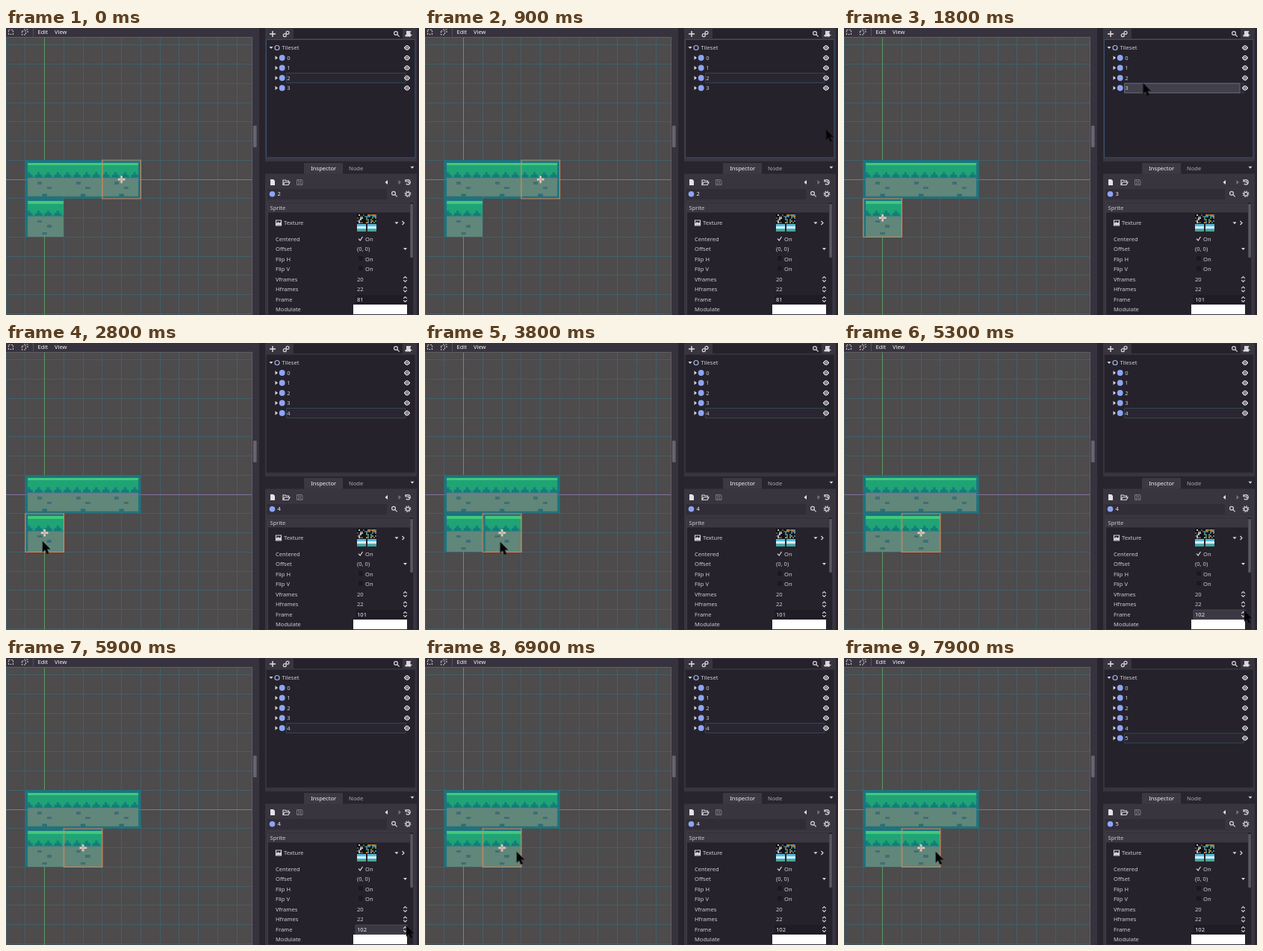
An HTML page for the animation above (8 s loop, 553 by 385 pixels).

```html
<!DOCTYPE html>
<html lang="en">
<head>
<meta charset="utf-8">
<title>Tileset editor</title>
<style>
html, body { margin: 0; width: 100%; height: 100%; overflow: hidden; background: #2a2631; }
svg { display: block; width: 100vw; height: 100vh; }
text { font: 7.55px "Noto Sans", "Open Sans", sans-serif; fill: #cfcdd3; }
.bright, .bright text { fill: #f4f3f6; }
.dim { fill: #aeaab5; }
.line { fill: none; stroke: #d8d6dc; stroke-width: 1.2; }

/* Editor states: pick 2, pick 3, copy to 4, change frame, copy to 5 */
.p2, .p3, .p4, .p5, .f81, .f101, .f102, .copy, .oldTile, .newTile, .hover, .edit, .focus, #pick, #outline {
  animation: 8s step-end infinite;
}
.p2, .f81 { animation-name: first; }
.p3 { animation-name: second; }
.p4 { animation-name: third; }
.p5 { animation-name: last; }
.f101 { animation-name: frameB; }
.f102, .newTile { animation-name: frameC; }
.copy { animation-name: copied; }
.oldTile { animation-name: dragged; }
.hover { animation-name: hover; }
.edit { animation-name: edit; }
.focus { animation-name: focus; }
#pick { animation-name: pick; }
#outline { animation-name: outline; }
#cursor { animation: cursor 8s ease-in-out infinite; }

@keyframes first { 0% { visibility: visible } 18.75%, 100% { visibility: hidden } }
@keyframes second { 0% { visibility: hidden } 18.75% { visibility: visible } 33.75%, 100% { visibility: hidden } }
@keyframes third { 0% { visibility: hidden } 33.75% { visibility: visible } 87.5%, 100% { visibility: hidden } }
@keyframes last { 0% { visibility: hidden } 87.5%, 100% { visibility: visible } }
@keyframes frameB { 0% { visibility: hidden } 18.75% { visibility: visible } 65%, 100% { visibility: hidden } }
@keyframes frameC { 0% { visibility: hidden } 65%, 100% { visibility: visible } }
@keyframes copied { 0% { visibility: hidden } 33.75%, 100% { visibility: visible } }
@keyframes hover { 0% { visibility: hidden } 18% { visibility: visible } 24%, 100% { visibility: hidden } }
@keyframes edit { 0% { visibility: hidden } 62% { visibility: visible } 77%, 100% { visibility: hidden } }
@keyframes focus { 0% { visibility: visible } 33.75%, 100% { visibility: hidden } }
@keyframes pick {
  0% { transform: none }
  18.75% { transform: translateY(13.5px) }
  33.75% { transform: translateY(27px) }
  87.5%, 100% { transform: translateY(40.5px) }
}
@keyframes outline {
  0% { transform: translate(128.9px, 177.4px) }
  18.75% { transform: translate(25.9px, 228.9px) }
  39% { transform: translate(51.6px, 228.9px) }
  43%, 100% { transform: translate(77.4px, 228.9px) }
}
@keyframes dragged {
  0% { visibility: hidden; transform: translate(25.9px, 228.9px) }
  33.75% { visibility: visible; transform: translate(25.9px, 228.9px) }
  39% { visibility: visible; transform: translate(51.6px, 228.9px) }
  43% { visibility: visible; transform: translate(77.4px, 228.9px) }
  65%, 100% { visibility: hidden; transform: translate(77.4px, 228.9px) }
}
@keyframes cursor {
  0%, 5% { transform: translate(560px, 150px) }
  10%, 11.5% { transform: translate(537px, 136px) }
  18%, 23% { transform: translate(400.5px, 74px) }
  31%, 36% { transform: translate(49px, 266px) }
  45%, 49% { transform: translate(100.7px, 267px) }
  58%, 62% { transform: translate(528.7px, 362px) }
  66%, 76% { transform: translate(536px, 359px) }
  86%, 100% { transform: translate(122.8px, 260px) }
}
</style>
</head>
<body>
<svg viewBox="0 0 553 385" preserveAspectRatio="none">
  <defs>
    <pattern id="teeth" width="4" height="16" patternUnits="userSpaceOnUse">
      <path d="M0 7.3V6H1V5H2V6H3V7H4V7.3z" fill="#147b7b"/>
    </pattern>
    <g id="ground" shape-rendering="crispEdges">
      <path d="M0 0H16V16H0z" fill="#61877a"/>
      <path d="M0 0H16V7.1H0z" fill="#20a476"/>
      <path d="M0 1H16V2.1H0z" fill="#41c87b"/>
      <path d="M0 0H16V1H0z" fill="#1b747f"/>
      <path d="M0 0H16V16H0z" fill="url(#teeth)"/>
      <path d="M5 9h2v1h-2zM9 11h2v1h-2z" fill="#416e75"/>
    </g>
    <path id="leftEdge" d="M0 0H1V16H0z" fill="#1b747f"/>
    <g id="platform">
      <use href="#ground"/>
      <path d="M0 15H16V16H0zM7 14h2v1h-2z" fill="#26707a"/>
    </g>
    <g id="wall">
      <use href="#ground"/>
      <path d="M7 14h2v1h-2z" fill="#416e75"/>
    </g>
    <g id="corner"><use href="#wall"/><use href="#leftEdge"/></g>
    <g id="eye">
      <path d="M-4.2 0Q0-7 4.2 0Q0 7-4.2 0z" fill="#e4e2e8"/>
      <circle r="2" fill="#25222c"/><circle r="1.1" fill="#e4e2e8"/>
    </g>
    <path id="spin" d="M-2.3-1.2L0-3.5 2.3-1.2M-2.3 1.2L0 3.5 2.3 1.2" class="line"/>
    <path id="drop" d="M-2.5-1.3H2.5L0 1.7z" fill="#d8d6dc"/>
    <g id="lens"><circle cx="-1" cy="-1" r="2.4" class="line"/><path d="M1 1L3.7 3.7" class="line" stroke-width="1.6"/></g>
  </defs>

  <!-- viewport -->
  <path d="M0 0H339V12H0z" fill="#37333e"/>
  <path d="M0 12H330V385H0z" fill="#4d4b4b"/>
  <g id="grid" fill="none" stroke="#41606b"></g>
  <path d="M51.5 12V385" stroke="#5a9a5f"/>
  <path d="M0 203.5H330" stroke="#82729a"/>
  <g id="tiles"></g>
  <g class="oldTile"><use href="#corner" transform="scale(3.22)"/></g>
  <g class="newTile"><use href="#wall" transform="translate(77.4 228.9) scale(3.22)"/></g>
  <path d="M26 203.5H180" stroke="#82729a" opacity=".6"/>
  <g id="outline">
    <path d="M0 0H51.5V51.5H0z" fill="none" stroke="#dc8760" stroke-width="1.2"/>
    <path d="M25.75 21V30.5M21 25.75H30.5" stroke="#f0d3c8" stroke-width="2.4"/>
    <path d="M25.75 23.5V28M23.5 25.75H28" stroke="#b99a98" stroke-width=".9"/>
  </g>
  <g fill="none" stroke="#c9c7cd" stroke-width="1.2" stroke-dasharray="2 1.5">
    <path d="M3.5 2.5H9.5V8.5H3.5z"/><path d="M21.5 4H26.5V9H21.5zM24 2H29V7"/>
  </g>
  <path d="M36.5 0V11" stroke="#55515d"/>
  <text x="42.5" y="7.7" class="bright">Edit</text>
  <text x="65" y="7.7" class="bright">View</text>
  <path d="M330 12H339V385H330z" fill="#37333e"/>
  <path d="M0 12.5H329.5V385" fill="none" stroke="#625e68"/>
  <rect x="331" y="131" width="4.6" height="29" rx="1" fill="#67636f"/>

  <!-- scene dock -->
  <path d="M339 0H347V385H339z" fill="#28242e"/>
  <path d="M347 0H550V179H347z" fill="#39353f"/>
  <path d="M385 1H531V14H385z" fill="#25222c"/>
  <path d="M357 4V12M353 8H361" stroke="#e4e2e8" stroke-width="1.4"/>
  <g class="line">
    <circle cx="377" cy="6.3" r="2"/><circle cx="373.3" cy="9.7" r="2"/>
  </g>
  <use href="#lens" x="523" y="8"/>
  <path d="M536 4H542.5L540.5 8V11.5H534.5V9H536z" fill="#d8d6dc"/>
  <path d="M538.5 9.5H543.5M541 7V12" stroke="#fff" stroke-width="1.2"/>
  <path d="M348.5 15.5H548V174H348.5z" fill="#25222c" stroke="#33303b"/>
  <path class="focus" d="M348.5 15.5H548V174H348.5z" fill="none" stroke="#3b4f6b"/>
  <g id="pick">
    <path d="M375.5 60.5H535V73.5H375.5z" fill="#292631" stroke="#38505f" stroke-width=".8"/>
  </g>
  <path class="hover" d="M375.5 74.3H530V87H375.5z" fill="#42404b" stroke="#6d7482" stroke-width=".8"/>
  <use href="#drop" x="355" y="26.4"/>
  <circle cx="363" cy="26.5" r="3" fill="none" stroke="#a9b5ea" stroke-width="1.2"/>
  <text x="369.5" y="29.2">Tileset</text>
  <use href="#eye" x="537" y="26.5"/>
  <g id="rows"></g>

  <!-- inspector dock -->
  <path d="M347 179H550V196H347z" fill="#29252f"/>
  <path d="M399 181H451V196H399z" fill="#3d3943"/>
  <text x="408.3" y="191" class="bright">Inspector</text>
  <text x="459" y="191" class="dim">Node</text>
  <use href="#drop" x="544" y="187"/>
  <path d="M347 195.5H550V385H347z" fill="#39353f"/>
  <path d="M354 203H358L360 205V211H354z" fill="#e4e2e8"/>
  <path d="M371 210.5V204H374L375 205H378.5V207M371 210.5L373 207H380L378 210.5z" class="line"/>
  <path d="M389.5 203.5H396L397 204.5V210.5H389.5zM391.5 203.5V206H395V203.5M391.5 210V208H395V210" fill="none" stroke="#77737e"/>
  <path d="M511 204V210L507.5 207z" fill="#e4e2e8"/>
  <path d="M525.5 204V210L529 207z" fill="#77737e"/>
  <path d="M535.5 205A3.2 3.2 0 1 1 535.8 209M535 203V206H538M539 205V207.5H541" class="line" stroke-width="1"/>
  <path d="M350 216H510V230H350z" fill="#312d38"/>
  <circle cx="356.5" cy="222.7" r="3.8" fill="#8da5f3"/>
  <g class="bright">
    <text x="363.5" y="225.4" class="p2">2</text>
    <text x="363.5" y="225.4" class="p3">3</text>
    <text x="363.5" y="225.4" class="p4">4</text>
    <text x="363.5" y="225.4" class="p5">5</text>
  </g>
  <use href="#lens" x="520" y="222.7"/>
  <circle cx="538" cy="222.7" r="2.4" class="line" stroke-width="1.6"/>
  <circle cx="538" cy="222.7" r="3.8" fill="none" stroke="#d8d6dc" stroke-width="1.2" stroke-dasharray="1.5 1.48"/>
  <path d="M350.5 233.5H546V385H350.5z" fill="#25222c" stroke="#454150" stroke-width=".8"/>
  <path d="M351 234.5H541V247.5H351z" fill="#3b3741"/>
  <text x="353.5" y="243.7">Sprite</text>
  <rect x="541.3" y="236" width="3.6" height="72" rx="1" fill="#5b5763"/>
  <path d="M361.5 258H368.5V265H361.5z" class="line"/>
  <path d="M362 264.5V262L364.5 260 366 261.5 368 260.5V264.5z" fill="#d8d6dc"/>
  <text x="372" y="264">Texture</text>
  <g id="thumb" shape-rendering="crispEdges"></g>
  <use href="#drop" x="523" y="261.5"/>
  <path d="M530.5 259L533 261.5 530.5 264" class="line"/>
  <g id="props"></g>
  <path d="M472 282.7L474.2 285 477.5 280" class="line" stroke-width="1.5"/>
  <path d="M472 306H478V312H472zM472 319.5H478V325.5H472z" fill="#1a1820"/>
  <use href="#drop" x="534.5" y="296.3"/>
  <path d="M468 358H537V370H468z" fill="#1f1c25"/>
  <path class="edit" d="M468 358H537V370H468z" fill="#3b3843" stroke="#55515d" stroke-width=".7"/>
  <g class="bright">
    <text x="470" y="366.6" class="f81">81</text>
    <text x="470" y="366.6" class="f101">101</text>
    <text x="470" y="366.6" class="f102">102</text>
  </g>
  <use href="#spin" x="534.5" y="337"/>
  <use href="#spin" x="534.5" y="350.5"/>
  <use href="#spin" x="534.5" y="364"/>
  <path d="M465 371H537V384H465z" fill="#fff"/>

  <path id="cursor" d="M0 0V14.5L3.2 11.5 5.6 17 8.3 15.8 5.9 10.6H10.3z" fill="#050507" stroke="#29262e" stroke-width=".5"/>
</svg>
<script>
const fill = (id, markup) => { document.getElementById(id).innerHTML = markup; };
const rect = (x, y, w, h, color) => `<rect x="${x}" y="${y}" width="${w}" height="${h}" fill="${color}"/>`;
const label = (x, y, s) => `<text x="${x}" y="${y + 2.7}">${s}</text>`;

// Grid lines sit on whole pixels, half a tile apart
const snap = (start, i) => Math.floor(start + i * 25.75) + 0.5;
let lines = "";
for (let i = 0; i < 13; i++) lines += `M${snap(0.2, i)} 12V385`;
for (let i = 0; i < 15; i++) lines += `M0 ${snap(22.9, i)}H330`;
fill("grid", `<path d="${lines}"/>`);

const tile = (id, col, row) =>
  `<use href="#${id}" transform="translate(${25.9 + col * 51.5} ${177.4 + row * 51.5}) scale(3.22)"/>`;
const edge = x => rect(x, 177.4, 3.2, 51.5, "#1b747f");
fill("tiles", [0, 1, 2].map(c => tile("platform", c, 0)).join("") + edge(25.9) + edge(177.2) + tile("corner", 0, 1));

fill("rows", [0, 1, 2, 3, 4, 5].map(i => {
  const y = 40 + i * 13.5;
  const shown = i === 4 ? "copy" : i === 5 ? "p5" : "";
  return `<g class="${shown}"><path d="M360.5 ${y - 2.7}V${y + 2.7}L364 ${y}z" fill="#d8d6dc"/>
    <circle cx="369.7" cy="${y}" r="3.9" fill="#8da5f3"/>${label(376.3, y, i)}
    <use href="#eye" x="537" y="${y}"/></g>`;
}).join(""));

const props = [["Centered", "On"], ["Offset", "(0, 0)"], ["Flip H", "On"], ["Flip V", "On"],
  ["Vframes", "20"], ["Hframes", "22"], ["Frame", ""], ["Modulate", ""]];
fill("props", props.map(([name, value], i) => {
  const y = 283 + i * 13.5;
  return label(361, y, name) + label(value === "On" ? 481 : 470, y, value);
}).join(""));

// Thumbnail: scattered tiles, grey then coloured, above two small landscapes
let seed = 7;
const random = () => (seed = seed * 16807 % 2147483647) / 2147483647;
const greys = ["#111015", "#111015", "#111015", "#55565a", "#bdbab4"];
const hues = ["#111015", "#111015", "#46825c", "#c07f35", "#4b7fa5"];
let thumb = rect(470, 249, 26, 13, "#16141a");
for (let i = 0; i < 78; i++) {
  const colors = i % 13 < 6 ? greys : hues;
  thumb += rect(470 + i % 13 * 2, 250 + Math.floor(i / 13) * 2, 2, 2, colors[Math.floor(random() * colors.length)]);
}
for (const x of [470, 484]) {
  thumb += rect(x, 263, 12, 10, "#55b9df") + rect(x, 266, 12, 3, "#d5eef0") + rect(x, 270, 12, 3, "#49a391");
}
fill("thumb", thumb);
</script>
</body>
</html>
```
